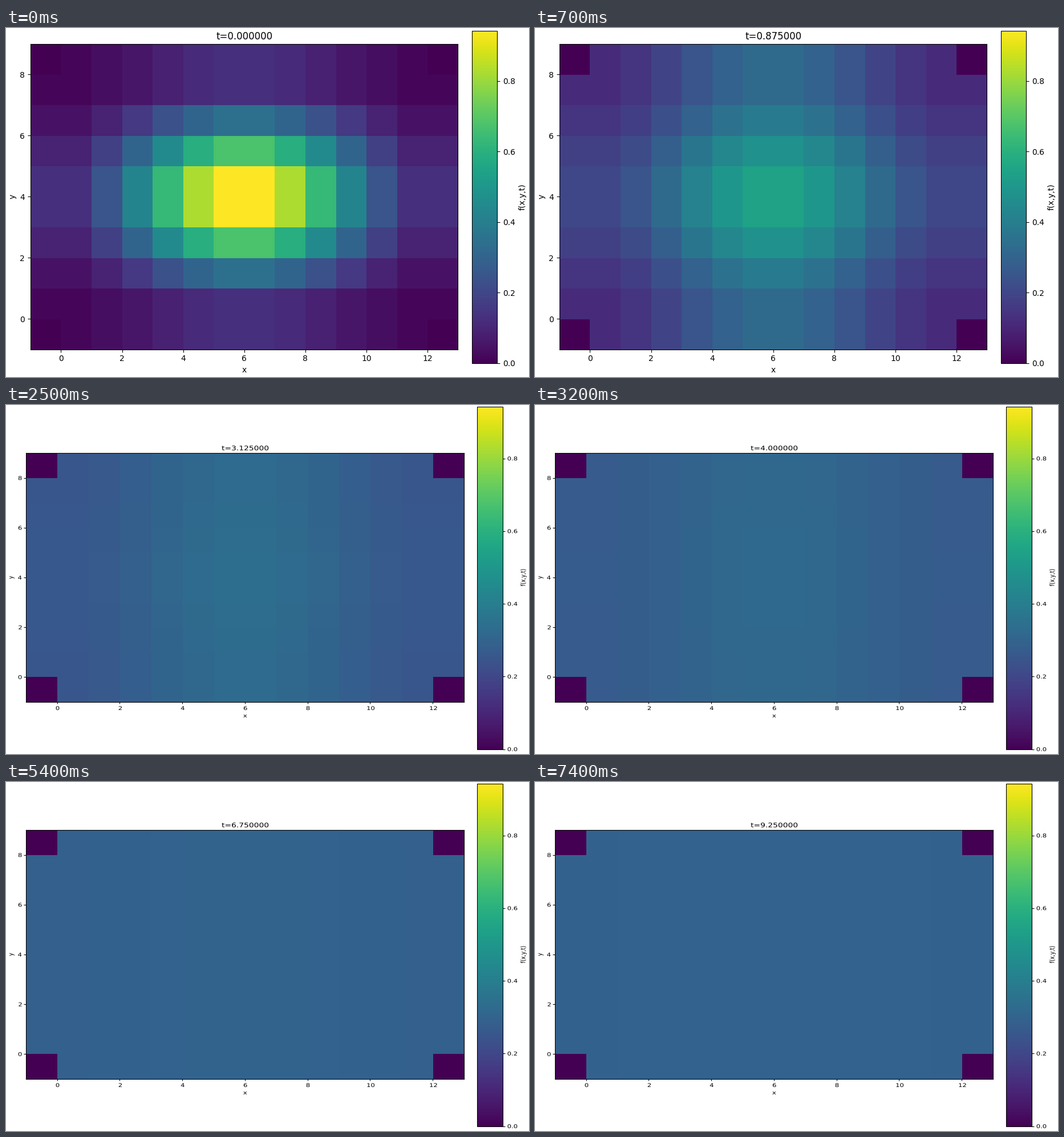
Write a matplotlib script that moves like this. It is 917 by 611 pixels and loops after 7600 ms.

```python
import numpy as np
import matplotlib.pyplot as plt
from matplotlib.animation import FuncAnimation
from matplotlib.patches import PathPatch
from matplotlib.textpath import TextPath
from matplotlib.transforms import Affine2D

W, H, DPI = 917, 611, 100
FRAMES, STEP_MS = 76, 100
NX, NY = 12, 8
DT, DIFF = 0.125, 2.0
RESIZE_AT = 12                 # step at which the window changes size
SX, SY = 0.83, 0.657           # scale of the resized window
EM = DPI / 72

plt.rcParams["font.family"] = "DejaVu Sans"


def with_ghosts(inner):
    """Add mirrored border cells; the corners stay empty."""
    f = np.pad(inner, 1, mode="edge")
    f[::NY + 1, ::NX + 1] = 0
    return f


def solve(steps):
    x, y = np.meshgrid(np.arange(NX) + 0.5, np.arange(NY) + 0.5)
    f = with_ghosts(np.exp(-(x - NX / 2) ** 2 / 15 - (y - NY / 2) ** 2 / 6))
    out = [f]
    for _ in range(steps - 1):
        c = f[1:-1, 1:-1]
        lap = f[1:-1, 2:] + f[1:-1, :-2] + f[2:, 1:-1] + f[:-2, 1:-1] - 4 * c
        f = with_ghosts(c + DIFF * DT * lap)
        out.append(f)
    return out


fields = solve(FRAMES - 1)
vmax = fields[0].max()

fig = plt.figure(figsize=(W / DPI, H / DPI), dpi=DPI, facecolor="white")
pixels = Affine2D().scale(1 / W, 1 / H) + fig.transFigure


def add_axes(x0, y0, x1, y1):
    """Axes from pixel edges, y counted from the top."""
    return fig.add_axes([x0 / W, 1 - y1 / H, (x1 - x0) / W, (y1 - y0) / H])


def add_view(box, bar_box):
    ax = add_axes(*box)
    im = ax.imshow(fields[0], origin="lower", extent=(-1, NX + 1, -1, NY + 1),
                   aspect="auto", interpolation="nearest",
                   cmap="viridis", vmin=0, vmax=vmax)
    ax.set_xticks(range(0, NX + 1, 2))
    ax.set_yticks(range(0, NY + 1, 2))
    cax = add_axes(*bar_box)
    bar = fig.colorbar(im, cax=cax)
    bar.set_ticks(np.arange(5) * 0.2)
    return ax, im, cax, bar


def text_path(s, x, y, pt=10, ha="center", va="base", turn=0):
    """Text outline in the resized window's scale, placed in pixels."""
    path = TextPath((0, 0), s, size=pt * EM)
    box = path.get_extents()
    dx = {"left": 0, "center": 0.5, "right": 1}[ha] * box.width
    dy = (box.y0 + box.y1) / 2 if va == "center" else 0
    place = (Affine2D().translate(-dx, -dy).rotate_deg(turn)
             .scale(SX, SY).translate(x, H - y))
    return place.transform_path(path)


def add_text(*args, **kw):
    patch = PathPatch(text_path(*args, **kw), fc="black", lw=0,
                      transform=pixels)
    fig.add_artist(patch)
    return patch


# first window size
ax1, im1, cax1, bar1 = add_view((42.9, 28, 792.4, 562.6),
                                (817, 4.5, 861, 586.5))
title1 = ax1.set_title("")
ax1.set_xlabel("x")
ax1.set_ylabel("y")
bar1.set_label("f(x,y,t)")

# resized window
L, T, R, B = 34.8, 84.3, 803.1, 519.95
BL, BT, BR, BB = 825.5, 2.5, 870.7, 602.6
ax2, im2, cax2, bar2 = add_view((L, T, R, B), (BL, BT, BR, BB))
ax2.tick_params(labelbottom=False, labelleft=False)
ax2.tick_params(axis="x", length=3.5 * SY)
ax2.tick_params(axis="y", length=3.5 * SX)
cax2.tick_params(labelright=False, length=3.5 * SX)

mid_x, mid_y = (L + R) / 2, (T + B) / 2
gap = 7 * EM * SX
title_at = mid_x, T - 5
title2 = add_text("t=0", *title_at, pt=12)
labels = [title2,
          add_text("x", mid_x, 547),
          add_text("y", 12.3, mid_y, turn=90),
          add_text("f(x,y,t)", 910.5, (BT + BB) / 2, turn=90)]
for v in range(0, NX + 1, 2):
    labels.append(add_text(str(v), L + (v + 1) * (R - L) / (NX + 2), 534))
for v in range(0, NY + 1, 2):
    labels.append(add_text(str(v), L - gap, B - (v + 1) * (B - T) / (NY + 2),
                           ha="right", va="center"))
for v in np.arange(5) * 0.2:
    labels.append(add_text(f"{v:.1f}", BR + gap, BB - v / vmax * (BB - BT),
                           ha="left", va="center"))

first = [ax1, cax1]
second = [ax2, cax2] + labels


def update(i):
    k = min(i, FRAMES - 2)
    resized = k >= RESIZE_AT
    for a in first:
        a.set_visible(not resized)
    for a in second:
        a.set_visible(resized)
    caption = f"t={k * DT:.6f}"
    if resized:
        im2.set_data(fields[k])
        title2.set_path(text_path(caption, *title_at, pt=12))
    else:
        im1.set_data(fields[k])
        title1.set_text(caption)
    return []


anim = FuncAnimation(fig, update, frames=FRAMES, interval=STEP_MS,
                     init_func=lambda: update(0), repeat=True,
                     repeat_delay=0, blit=False)
plt.show()
```
